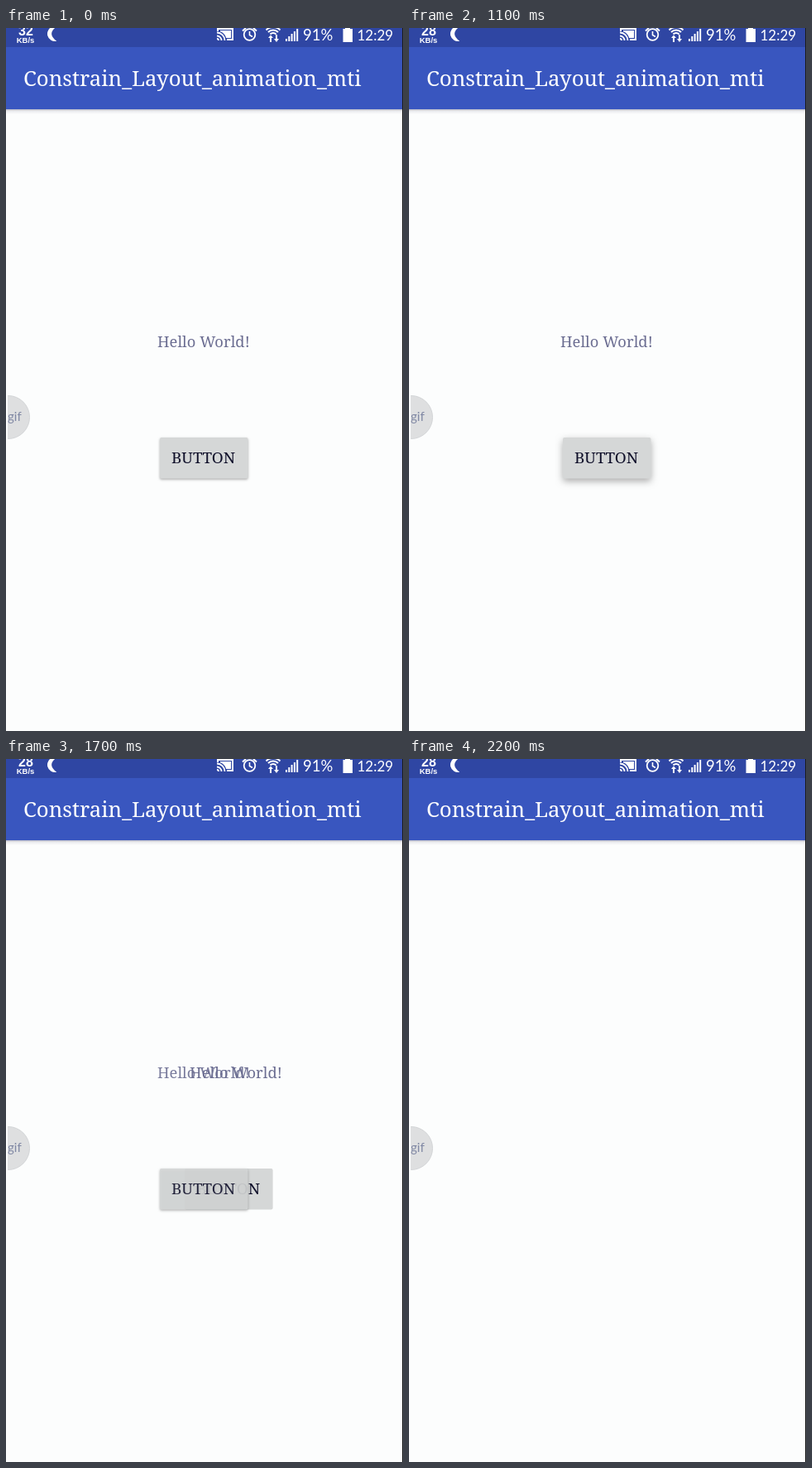
These frames come from a looping animation (480x848 px, 2300 ms). An HTML page with a canvas:

```html
<!DOCTYPE html>
<html lang="en">
<head>
<meta charset="utf-8">
<title>Layout animation</title>
<style>
html, body { margin: 0; width: 100%; height: 100%; overflow: hidden; background: #fcfdfd; }
canvas { display: block; width: 480px; height: 848px; }
</style>
</head>
<body>
<canvas id="stage" width="480" height="848"></canvas>
<script>
const ctx = document.getElementById('stage').getContext('2d');
const LOOP = 2300, STEP = 100;
const SERIF = '"Noto Serif", serif';
const SANS = 'Lato, sans-serif';
const BOLD = '"Liberation Sans", Arial, sans-serif';

function rect(x, y, w, h, color) {
  ctx.fillStyle = color;
  ctx.fillRect(x, y, w, h);
}

function text(str, x, y, font, color, align = 'left') {
  ctx.font = font;
  ctx.fillStyle = color;
  ctx.textAlign = align;
  ctx.fillText(str, x, y);
}

function poly(points, color) {
  ctx.fillStyle = color;
  ctx.beginPath();
  points.forEach(([x, y]) => ctx.lineTo(x, y));
  ctx.fill();
}

function arc(x, y, r, from, to, width) {
  ctx.lineWidth = width;
  ctx.beginPath();
  ctx.arc(x, y, r, from * Math.PI, to * Math.PI);
  ctx.stroke();
}

function line(width, ...points) {
  ctx.lineWidth = width;
  ctx.beginPath();
  points.forEach(([x, y]) => ctx.lineTo(x, y));
  ctx.stroke();
}

function moon() {
  ctx.fillStyle = '#fff';
  ctx.beginPath();
  ctx.arc(59, 7, 9, 0.42 * Math.PI, 1.58 * Math.PI);
  ctx.quadraticCurveTo(49, 7, 61.2, 15.7);
  ctx.fill();
}

function castIcon() {
  line(2, [256, 4], [256, 1], [274, 1], [274, 14], [267, 14]);
  rect(259, 3, 13, 9, '#fff');
  ctx.save();
  ctx.beginPath();
  ctx.rect(255, 4, 12, 11);
  ctx.clip();
  ctx.fillStyle = '#2f46a3';
  ctx.beginPath();
  ctx.arc(255, 15, 11.5, 0, 2 * Math.PI);
  ctx.fill();
  [2, 5.5, 9.5].forEach(r => arc(255, 15, r, 1.5, 2, 1.8));
  ctx.restore();
}

function alarmIcon() {
  arc(294.5, 8, 6.8, 0, 2, 1.8);
  line(1.6, [294.5, 4], [294.5, 8.5], [298, 10.5]);
  line(2, [286, 3.5], [290, 0]);
  line(2, [299, 0], [303, 3.5]);
}

function wifiIcon() {
  [5, 8.5, 12].forEach(r => arc(323, 11, r, 1.25, 1.75, 2));
  poly([[317, 12], [320, 8.5], [323, 12]], '#fff');
  rect(319, 11, 2, 6, '#fff');
  poly([[324, 13], [330, 13], [327, 17]], '#fff');
  rect(326, 8, 2, 6, '#fff');
}

function statusBar(t) {
  rect(0, 0, 480, 23, '#2f46a3');
  ctx.strokeStyle = '#fff';
  text(t < 600 ? '32' : '28', 24, 9, 'bold 16px ' + BOLD, '#fff', 'center');
  text('KB/s', 23.5, 18, 'bold 9.5px ' + BOLD, '#fff', 'center');
  moon();
  castIcon();
  alarmIcon();
  wifiIcon();
  for (let i = 0; i < 5; i++) rect(338 + i * 3.3, 13 - i * 3, 2, 3 + i * 3, '#fff');
  text('91%', 359, 14.5, '18.5px ' + SANS, '#fff');
  rect(407.5, 1, 11.5, 16, '#fff');
  rect(410, 0, 6, 2, '#fff');
  text('12:29', 424.5, 14.5, '17px ' + SANS, '#fff');
}

function appBar() {
  const shade = ctx.createLinearGradient(0, 98, 0, 104);
  shade.addColorStop(0, 'rgba(70,70,100,.36)');
  shade.addColorStop(0.4, 'rgba(90,90,120,.1)');
  shade.addColorStop(1, 'rgba(90,90,120,0)');
  rect(0, 98, 480, 6, shade);
  rect(0, 23, 480, 75, '#3956bf');
  text('Constrain_Layout_animation_mti', 21, 70, '25.8px ' + SERIF, '#fff');
}

function badge() {
  ctx.save();
  ctx.beginPath();
  ctx.rect(2, 440, 30, 60);
  ctx.clip();
  ctx.fillStyle = '#dedfe0';
  ctx.strokeStyle = '#d3d5d7';
  ctx.lineWidth = 1;
  ctx.beginPath();
  ctx.arc(2.5, 469.5, 26, 0, 2 * Math.PI);
  ctx.fill();
  ctx.stroke();
  ctx.restore();
  text('gif', 2, 474, '15px ' + SANS, '#8088a4');
}

function hello(dx) {
  text('Hello World!', 183 + dx, 384.5, '18.4px ' + SERIF, '#6c6e92');
}

function button(dx, blur) {
  ctx.save();
  if (blur) {
    ctx.shadowColor = 'rgba(0,0,0,.32)';
    ctx.shadowBlur = blur;
    ctx.shadowOffsetY = blur / 2.5;
  }
  ctx.fillStyle = '#d5d7d7';
  ctx.beginPath();
  ctx.roundRect(186 + dx, 494, 106.5, 49.5, 2);
  ctx.fill();
  ctx.restore();
  text('BUTTON', 200 + dx, 525, '18.9px ' + SERIF, '#10102a');
}

// Accelerating slide to the right
const slide = (t, start, rate) => Math.pow(Math.max(0, t - start) * rate / 1000, 4);

function content(t) {
  const pressed = t >= 1000 && t < 1300;
  if (t < 1300) {
    hello(0);
    button(0, pressed ? 8 : 3);
    return;
  }
  const fade = Math.max(0, Math.min(1, (2060 - t) / 400));
  const textDx = Math.max(1, slide(t, 1288, 6.07));
  const buttonDx = slide(t, 1330, 6.33);
  button(buttonDx, 0);
  if (t < 2000) {
    ctx.globalAlpha = fade;
    button(0, 3);
    hello(0);
    ctx.globalAlpha = 1;
  }
  hello(textDx);
}

function draw(now) {
  const t = Math.floor((now % LOOP) / STEP) * STEP;
  rect(0, 0, 480, 848, '#fcfdfd');
  content(t);
  badge();
  appBar();
  statusBar(t);
  rect(479, 0, 1, 848, '#1c1c1c');
}

const begin = performance.now();
function tick() {
  draw(performance.now() - begin);
  requestAnimationFrame(tick);
}
tick();
</script>
</body>
</html>
```
